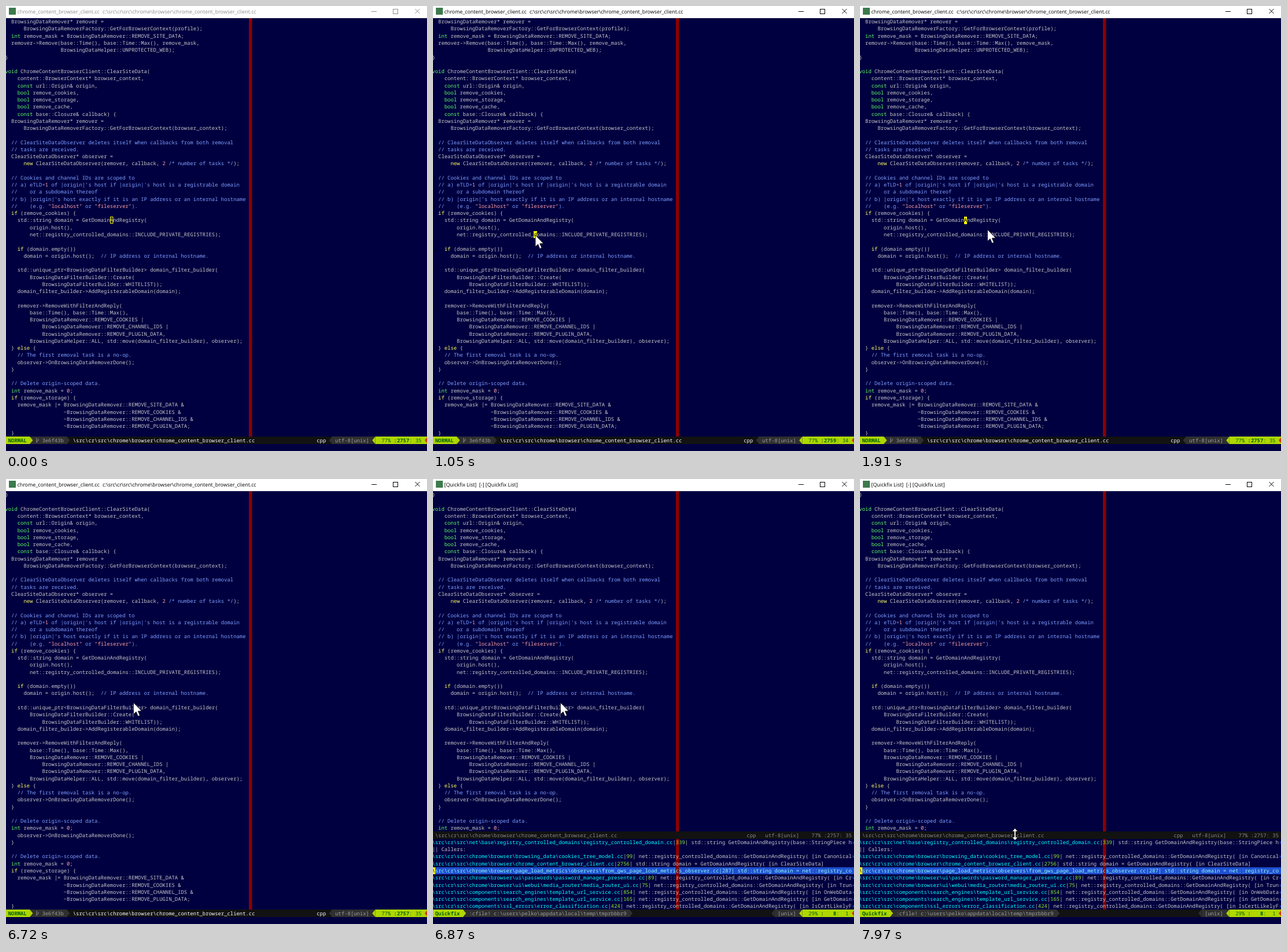
Write an HTML page with a canvas that moves like this. It is 728x769 px and loops after 8 s.

```html
<!DOCTYPE html>
<html lang="en">
<head>
<meta charset="utf-8">
<title>Editor</title>
<style>
html, body { margin: 0; width: 100%; height: 100%; overflow: hidden; background: #000040; }
canvas { display: block; }
</style>
</head>
<body>
<canvas id="stage" width="728" height="769"></canvas>
<script>
const W = 728, H = 769, LOOP = 8000;
const CELL = 5.335, LINE = 12.26, LEFT = -1.6, TOP = 21, COLS = 137;
const MONO = '8.89px "Noto Sans Mono", "DejaVu Sans Mono", monospace';
const UI = '8.9px "Open Sans", "Noto Sans", sans-serif';

const C = {
  bg: '#000040', text: '#c8c8c8', comment: '#80a0ff', constant: '#ffa0a0',
  keyword: '#ffff60', type: '#60ff60', column: '#8b0000', cursor: '#ffff00',
  path: '#00ffff', lineNr: '#90f020', extend: '#2048ff', pick: '#2050d0', pickText: '#90fff0',
  lime: '#afd700', limeText: '#005f00', mid: '#303030', midText: '#9e9e9e',
  bar: '#121212', idle: '#8a8a8a', warn: '#d23a10'
};

const CODE = `  BrowsingDataRemover* remover =
      BrowsingDataRemoverFactory::GetForBrowserContext(profile);
  int remove_mask = BrowsingDataRemover::REMOVE_SITE_DATA;
  remover->Remove(base::Time(), base::Time::Max(), remove_mask,
                  BrowsingDataHelper::UNPROTECTED_WEB);
}

void ChromeContentBrowserClient::ClearSiteData(
    content::BrowserContext* browser_context,
    const url::Origin& origin,
    bool remove_cookies,
    bool remove_storage,
    bool remove_cache,
    const base::Closure& callback) {
  BrowsingDataRemover* remover =
      BrowsingDataRemoverFactory::GetForBrowserContext(browser_context);

  // ClearSiteDataObserver deletes itself when callbacks from both removal
  // tasks are received.
  ClearSiteDataObserver* observer =
      new ClearSiteDataObserver(remover, callback, 2 /* number of tasks */);

  // Cookies and channel IDs are scoped to
  // a) eTLD+1 of |origin|'s host if |origin|'s host is a registrable domain
  //    or a subdomain thereof
  // b) |origin|'s host exactly if it is an IP address or an internal hostname
  //    (e.g. "localhost" or "fileserver").
  if (remove_cookies) {
    std::string domain = GetDomainAndRegistry(
        origin.host(),
        net::registry_controlled_domains::INCLUDE_PRIVATE_REGISTRIES);

    if (domain.empty())
      domain = origin.host();  // IP address or internal hostname.

    std::unique_ptr<BrowsingDataFilterBuilder> domain_filter_builder(
        BrowsingDataFilterBuilder::Create(
            BrowsingDataFilterBuilder::WHITELIST));
    domain_filter_builder->AddRegisterableDomain(domain);

    remover->RemoveWithFilterAndReply(
        base::Time(), base::Time::Max(),
        BrowsingDataRemover::REMOVE_COOKIES |
            BrowsingDataRemover::REMOVE_CHANNEL_IDS |
            BrowsingDataRemover::REMOVE_PLUGIN_DATA,
        BrowsingDataHelper::ALL, std::move(domain_filter_builder), observer);
  } else {
    // The first removal task is a no-op.
    observer->OnBrowsingDataRemoverDone();
  }

  // Delete origin-scoped data.
  int remove_mask = 0;
  if (remove_storage) {
    remove_mask |= BrowsingDataRemover::REMOVE_SITE_DATA &
                   ~BrowsingDataRemover::REMOVE_COOKIES &
                   ~BrowsingDataRemover::REMOVE_CHANNEL_IDS &
                   ~BrowsingDataRemover::REMOVE_PLUGIN_DATA;
  }`.split('\n');

const raw = String.raw;
const SRC = raw`\src\cr\src`, BROWSER = SRC + raw`\chrome\browser`, PARTS = SRC + raw`\components`;
const FILE = 'chrome_content_browser_client.cc';
const FILE_PATH = BROWSER + '\\' + FILE;
const CALL = 'GetDomainAndRegistry(';
const NET_CALL = ' net::registry_controlled_domains::' + CALL + ' [in ';
const SERVICE = PARTS + raw`\search_engines\template_url_service.cc`;

const HITS = [
  [SRC + raw`\net\base\registry_controlled_domains\registry_controlled_domain.cc`, 339, ` std::string ${CALL}base::StringPiece host`],
  ['', '', ' Callers:'],
  [BROWSER + raw`\browsing_data\cookies_tree_model.cc`, 99, NET_CALL + 'Canonicalize'],
  [FILE_PATH, 2756, ` std::string domain = ${CALL} [in ClearSiteData]`],
  [BROWSER + raw`\page_load_metrics\observers\from_gws_page_load_metrics_observer.cc`, 287, ' std::string domain = net::registry_controlled'],
  [BROWSER + raw`\ui\passwords\password_manager_presenter.cc`, 89, NET_CALL + 'Create'],
  [BROWSER + raw`\ui\webui\media_router\media_router_ui.cc`, 75, NET_CALL + 'Truncate'],
  [SERVICE, 854, NET_CALL + 'OnWebDataService'],
  [SERVICE, 165, NET_CALL + 'GetDomainName'],
  [PARTS + raw`\ssl_errors\error_classification.cc`, 424, NET_CALL + 'IsCertLikelyFrom']
];

// Later rules override earlier ones.
const RULES = [
  [/\b(if|else|new)\b/g, C.keyword],
  [/\b(void|const|bool|int)\b/g, C.type],
  [/\/\/.*|\/\*.*?\*\//g, C.comment],
  [/"\w+"|\b\d+\b/g, C.constant]
];

const stage = document.getElementById('stage').getContext('2d');
const page = document.createElement('canvas');
page.width = W;
page.height = H;
const g = page.getContext('2d');

const colX = c => LEFT + c * CELL;
const rowY = r => TOP + r * LINE;

function cells(row, col, count, color) {
  const x = Math.round(colX(col)), y = Math.round(rowY(row));
  g.fillStyle = color;
  g.fillRect(x, y, Math.round(colX(col + count)) - x, Math.round(rowY(row + 1)) - y);
}

// Writes on the character grid; color may be one value or one per character.
function write(row, col, str, color, bold) {
  g.font = (bold ? 'bold ' : '') + MONO;
  [...str].forEach((ch, i) => {
    if (ch === ' ') return;
    g.fillStyle = Array.isArray(color) ? color[i] : color;
    g.fillText(ch, colX(col + i), rowY(row) + 9.2);
  });
}

function codeLine(row, line) {
  const colors = Array(line.length).fill(C.text);
  for (const [re, color] of RULES)
    for (const m of line.matchAll(re))
      colors.fill(color, m.index, m.index + m[0].length);
  write(row, 0, line, colors);
}

function arrow(row, col, color, dir) {
  const a = colX(dir > 0 ? col : col + 1), b = a + dir * CELL;
  const y = Math.round(rowY(row)), y2 = Math.round(rowY(row + 1));
  g.fillStyle = color;
  g.beginPath();
  g.moveTo(a, y);
  g.lineTo(b, (y + y2) / 2);
  g.lineTo(a, y2);
  g.fill();
}

function branchIcon(row, col) {
  const x = colX(col) + 1.2, y = rowY(row) + 2;
  g.strokeStyle = C.midText;
  g.lineWidth = 0.9;
  g.beginPath();
  g.moveTo(x, y);
  g.lineTo(x, y + 8.5);
  g.moveTo(x, y + 6.5);
  g.lineTo(x + 3, y + 4.5);
  g.lineTo(x + 3, y + 1.5);
  g.stroke();
}

function position(row, col, pct, line, column, color, boldLine) {
  write(row, col, pct + '% ', color);
  write(row, col + 4, ':' + String(line).padStart(4), color, boldLine);
  write(row, col + 9, ':' + String(column).padStart(3), color);
}

function statusBar(mode, info, infoCol, encoding, encCol, pos) {
  const row = 59, modeEnd = mode.length + 2, infoEnd = infoCol + info.length + 1;
  cells(row, 0, COLS, C.bar);
  cells(row, modeEnd, infoEnd - modeEnd, C.mid);
  arrow(row, infoEnd, C.mid, 1);
  cells(row, 0, modeEnd, C.lime);
  arrow(row, modeEnd, C.lime, 1);
  write(row, 1, mode, C.limeText, true);
  write(row, infoCol, info, C.midText);
  cells(row, encCol - 1, 120 - encCol + 1, C.mid);
  arrow(row, encCol - 2, C.mid, -1);
  write(row, encCol, encoding, C.midText);
  arrow(row, 119, C.lime, -1);
  cells(row, 120, 17, C.lime);
  position(row, 122, ...pos, C.limeText, true);
  arrow(row, 136, C.warn, -1);
}

function fileStatus(line, column) {
  statusBar('NORMAL', '3e6f43b', 12, 'utf-8[unix]', 107, [77, line, column]);
  branchIcon(59, 10);
  write(59, 22, FILE_PATH, '#fff');
  write(59, 101, 'cpp', '#fff');
}

function idleStatus() {
  cells(48, 0, COLS, C.bar);
  write(48, 1, FILE_PATH, C.idle);
  write(48, 102, 'cpp', C.idle);
  write(48, 108, 'utf-8[unix]', C.idle);
  position(48, 123, 77, 2757, 35, C.idle);
}

function hitList() {
  HITS.forEach(([path, num, rest], i) => {
    const row = 49 + i, picked = i === 4;
    if (picked) {
      cells(row, 0, COLS, C.pick);
      cells(row, 79, 1, C.column);
    }
    const parts = [[path, C.path], ['|', C.text], [String(num), C.lineNr], ['|' + rest, C.text]];
    const full = parts.map(p => p[0]).join('');
    const colors = parts.flatMap(([s, c]) => Array(s.length).fill(picked ? C.pickText : c));
    write(row, 0, full.slice(0, COLS - 1), colors);
    if (full.length >= COLS) write(row, COLS - 1, '›', C.extend, true);
  });
}

function titleBar(parts, color) {
  g.fillStyle = '#fff';
  g.fillRect(0, 0, W, TOP);
  g.fillStyle = '#3d7a4c';
  g.fillRect(5, 3, 12, 12);
  g.font = UI;
  g.fillStyle = color;
  for (const [x, s] of parts) g.fillText(s, x, 13);
  g.strokeStyle = color;
  g.lineWidth = 1;
  g.strokeRect(669.5, 5.5, 8, 8);
  g.beginPath();
  g.moveTo(632, 9.5);
  g.lineTo(641, 9.5);
  g.moveTo(707.5, 5);
  g.lineTo(715.5, 13);
  g.moveTo(715.5, 5);
  g.lineTo(707.5, 13);
  g.stroke();
}

function blockCursor(row, col, ch) {
  cells(row, col, 1, C.cursor);
  write(row, col, ch, '#000');
}

function hollowCursor(row, col) {
  g.strokeStyle = C.cursor;
  g.lineWidth = 1;
  g.strokeRect(Math.round(colX(col)) + 0.5, Math.round(rowY(row)) + 0.5, 4.5, 11);
}

// Views in order, each with the time it ends.
const VIEWS = [
  ['blurred', 1050], ['clicked', 1680], ['normal', 6720],
  ['scrolled', 6800], ['split', 6870], ['list', LOOP]
];

function paint(view) {
  const is = (...names) => names.includes(view);
  const split = is('split', 'list'), moved = split || is('scrolled');
  g.textRendering = 'geometricPrecision';
  g.fillStyle = C.bg;
  g.fillRect(0, 0, W, H);
  g.fillStyle = C.column;
  g.fillRect(420, TOP, 5.5, rowY(59) - TOP);

  for (let r = 0; r < (split ? 48 : 59); r++)
    codeLine(r, CODE[moved && r < 48 ? r + 5 : r] || '');

  if (split) {
    idleStatus();
    hitList();
  }
  if (view === 'list') {
    titleBar([[19.5, '[Quickfix List]  [-] [Quickfix List]']], '#000');
    statusBar('Quickfix', raw`:cfile! c:\users\pelko\appdata\local\temp\tmprbbbr9`, 12, '[unix]', 112, [29, 8, 1]);
    blockCursor(53, 0, '\\');
    return;
  }
  titleBar([[19.5, FILE], [167, 'c:' + FILE_PATH]], is('blurred') ? '#8c8c8c' : '#000');
  if (is('clicked')) fileStatus(2759, 34);
  else fileStatus(2757, 35);
  if (is('blurred')) hollowCursor(28, 34);
  if (is('clicked')) blockCursor(30, 33, 'd');
  if (is('normal')) blockCursor(28, 34, 'A');
}

// Pointer moves: first step, step length, step count, from, to, easing.
const linear = u => u, easeOut = u => 1 - (1 - u) * (1 - u);
const MOVES = [
  [101, 79, 11, [606, 757], [177, 396], easeOut],
  [1120, 80, 5, [177, 396], [183, 375], linear],
  [1750, 80, 2, [183, 375], [220.5, 386.5], linear],
  [7095, 85, 3, [220.5, 386.5], [265.5, 553.5], easeOut],
  [7330, 80, 8, [265.5, 553.5], [268, 614], linear]
];

function pointerAt(t) {
  let at = null;
  for (const [start, step, count, from, to, ease] of MOVES) {
    const k = Math.min(count, Math.floor((t - start) / step));
    if (k < 1) break;
    const p = ease(k / count);
    at = from.map((v, i) => v + (to[i] - v) * p);
  }
  return at;
}

function shape(x, y, points) {
  stage.beginPath();
  for (const [px, py] of points) stage.lineTo(x + px, y + py);
  stage.closePath();
  stage.fillStyle = '#fff';
  stage.strokeStyle = '#000';
  stage.lineWidth = 0.8;
  stage.fill();
  stage.stroke();
}

const ARROW = [[0, 0], [0, 20], [4.6, 15.8], [7.8, 23.4], [11, 22], [7.8, 14.7], [14, 14.4]];
const HALF = [[0, -10.5], [5, -5], [1.4, -5], [1.4, 5], [5, 5], [0, 10.5]];
const RESIZE = HALF.concat(HALF.slice(1, 5).reverse().map(([x, y]) => [-x, y]));

let shown = '';
function frame(now) {
  const t = now % LOOP;
  const view = VIEWS.find(v => t < v[1])[0];
  if (view !== shown) paint(shown = view);
  stage.drawImage(page, 0, 0);
  const at = pointerAt(t);
  if (at) shape(...at, at[1] > 609 ? RESIZE : ARROW);
  requestAnimationFrame(frame);
}
requestAnimationFrame(frame);
</script>
</body>
</html>
```
